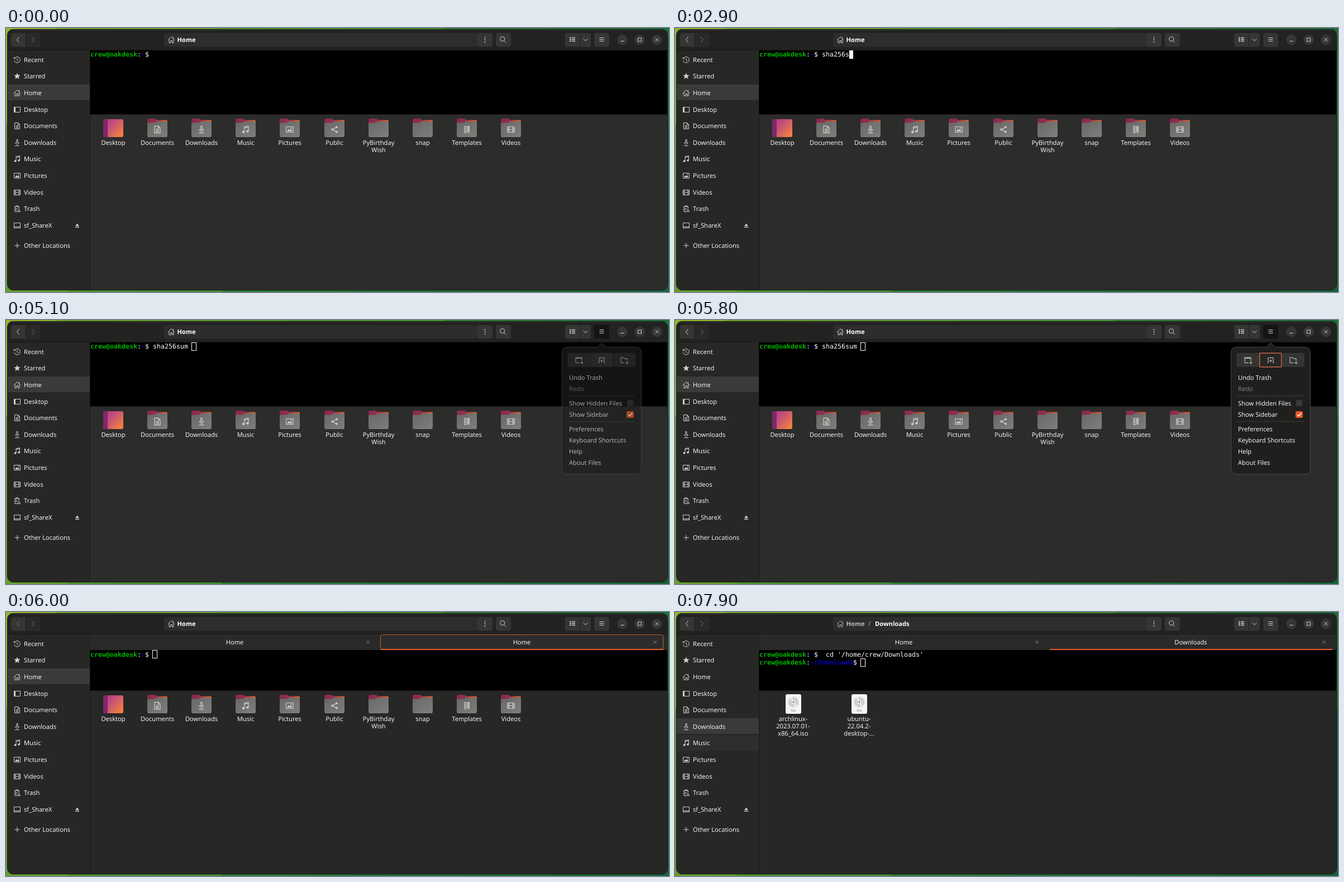
Write an HTML page that moves like this. It is 1187 px wide and 472 px high and loops after 8 s.

```html
<!DOCTYPE html>
<html lang="en">
<head>
<meta charset="utf-8">
<title>File manager with terminal</title>
<style>
html, body { margin: 0; width: 100%; height: 100%; overflow: hidden; background: #2a7a35; }
svg { display: block; width: 100%; height: 100%; }
text { font: 11.2px "Open Sans", "Noto Sans", sans-serif; fill: #fff; white-space: pre; text-rendering: geometricPrecision; }
.bold { font-weight: 700; }
.mid { text-anchor: middle; }
.dim { fill: #8a8a88; }
.term { font: 11.63px "DejaVu Sans Mono", monospace; fill: #fff; }
.term .user { font-weight: 700; fill: #00b400; }
.term .dir { font-weight: 700; fill: #0000b4; }
.icon { fill: none; stroke: #d2d2d0; stroke-width: 1; }
.icon .solid { fill: #d2d2d0; stroke: none; }
</style>
</head>
<body>
<svg id="stage" viewBox="0 0 1187 472">
  <defs>
    <linearGradient id="wallTop">
      <stop offset="0" stop-color="#93b62b"/><stop offset=".075" stop-color="#8db42b"/>
      <stop offset=".077" stop-color="#6fa42c"/><stop offset=".4" stop-color="#559a2e"/>
      <stop offset=".66" stop-color="#459330"/><stop offset=".663" stop-color="#2b8135"/>
      <stop offset="1" stop-color="#1b7038"/>
    </linearGradient>
    <linearGradient id="wallLow">
      <stop offset="0" stop-color="#679f2c"/><stop offset=".093" stop-color="#5f9b2c"/>
      <stop offset=".095" stop-color="#4b902e"/><stop offset=".325" stop-color="#3f8930"/>
      <stop offset=".327" stop-color="#2a7933"/><stop offset="1" stop-color="#17623a"/>
    </linearGradient>
    <linearGradient id="back"><stop offset="0" stop-color="#85294f"/><stop offset=".4" stop-color="#93304d"/><stop offset="1" stop-color="#ea652c"/></linearGradient>
    <linearGradient id="front" x2="1" y2="1"><stop offset="0" stop-color="#686866"/><stop offset="1" stop-color="#7e7e7c"/></linearGradient>
    <linearGradient id="frontHover" x2="1" y2="1"><stop offset="0" stop-color="#7b7b79"/><stop offset="1" stop-color="#929290"/></linearGradient>
    <linearGradient id="desk" x2="1" y2=".8"><stop offset="0" stop-color="#a83c86"/><stop offset=".4" stop-color="#c04e7c"/><stop offset="1" stop-color="#f5813f"/></linearGradient>
  </defs>
  <rect width="1187" height="172" fill="url(#wallTop)"/>
  <rect y="172" width="1187" height="300" fill="url(#wallLow)"/>
  <g id="scene"></g>
</svg>
<script>
const LOOP = 8000, USER = 'crew', HOST = 'oakdesk', CELL = 7;
const sceneEl = document.getElementById('scene');

const rect = (x, y, w, h, fill, r = 0, more = '') =>
  `<rect x="${x}" y="${y}" width="${w}" height="${h}" rx="${r}" fill="${fill}" ${more}/>`;
const text = (x, y, s, cls = '') => `<text x="${x}" y="${Math.round(y)}" class="${cls}">${s}</text>`;
const path = (d, cls = '') => `<path d="${d}" class="${cls}"/>`;
const at = (x, y, body, alpha = 1, scale = 1) =>
  `<g class="icon" transform="translate(${x} ${y}) scale(${scale})" opacity="${alpha}">${body}</g>`;

const icons = {
  Recent: path('M-4.6-2.8A5.3 5.3 0 1 1-5.2 1M-5.5-5V-2.2H-2.7M0-3V.5L2.5 2'),
  Starred: path('M0-5.8L1.6-1.8L5.8-1.6L2.5 1L3.6 5.2L0 2.8L-3.6 5.2L-2.5 1L-5.8-1.6L-1.6-1.8Z', 'solid'),
  Home: path('M-5.8.5L0-5.3L5.8.5M-4-1V5.5H-1V1.5H1.5V5.5H4V-1M3.5-5V-2'),
  Desktop: path('M-5.5-4.5H5.5V4.5H-5.5Z') + path('M-5.5-4.5H-3V4.5H-5.5Z', 'solid'),
  Documents: path('M-4.5-5.5H1.5L4.5-2.5V5.5H-4.5ZM1.5-5.5V-2.5H4.5M-2.5-.5H2.5M-2.5 1.5H2.5M-2.5 3.5H2.5'),
  Downloads: path('M-1-5.5H1V.2H3.4L0 3.6L-3.4.2H-1ZM-4 5.5H4'),
  Music: path('M-2 4V-4L4.5-5.5V2.8M-2-2.5L4.5-4') +
    '<g class="solid"><ellipse cx="-3.5" cy="4" rx="2" ry="1.7"/><ellipse cx="3" cy="2.8" rx="2" ry="1.7"/></g>',
  Pictures: path('M-5.5-4.5H5.5V4.5H-5.5Z') + path('M-4 3L-1.5-.8L.2 1L2-.6L4 3ZM1.5-3H3.3V-1.4H1.5Z', 'solid'),
  Videos: path('M-5.5-4.5H5.5V4.5H-5.5ZM-3-4.5V4.5M3-4.5V4.5M-3 0H3M-5.5-1.5H-3M-5.5 1.5H-3M3-1.5H5.5M3 1.5H5.5'),
  Trash: path('M-5-3.5H4M-2-3.5V-5.3H1.5V-3.5M-4-3.5V5.3H0M3.3-3.5V0M-2-1V3M0-1V1M.5 5.3L3 1L5.6 5.3Z'),
  sf_ShareX: path('M-5.5-4.5H5.5V4.5H-5.5ZM-5.5 2.5H5.5'),
  'Other Locations': path('M-4.5 0H4.5M0-4.5V4.5'),
  Public: path('M3.2-3.5L-3.2 0L3.2 3.5') +
    '<g class="solid"><circle cx="3.5" cy="-3.7" r="1.6"/><circle cx="-3.6" r="1.6"/><circle cx="3.5" cy="3.7" r="1.6"/></g>',
  Templates: path('M-3.5-5H-1V5H-3.5ZM-3.5-2H-2M-3.5 1H-2M1.5-5H4V3L2.8 5L1.5 3Z') + path('M1.5-5H2.8V5L1.5 3Z', 'solid'),
};
const places = ['Recent', 'Starred', 'Home', 'Desktop', 'Documents', 'Downloads',
  'Music', 'Pictures', 'Videos', 'Trash', 'sf_ShareX', 'Other Locations'];
const folders = ['Desktop', 'Documents', 'Downloads', 'Music', 'Pictures', 'Public',
  'PyBirthday Wish', 'snap', 'Templates', 'Videos'];

const button = (x, w, fill = '#353534') => rect(x, 9, w, 24.5, fill, 4);

function header(s) {
  let out = button(9, 53) + rect(35.5, 9, 26.5, 24.5, '#292928', 4) + rect(35, 9, 1, 24.5, '#1c1c1b');
  out += at(21.5, 21, path('M2-5L-2 0L2 5'), s.canBack ? 1 : .45);
  out += at(48.5, 21, path('M-2-5L2 0L-2 5'), .45);
  out += rect(283, 9, 561, 24.5, '#2d2d2c', 4) + button(844, 27) + button(877, 27);
  out += at(296, 21, icons.Home, s.downloads ? .75 : 1);
  out += s.downloads
    ? `<g opacity=".68">${text(306.5, 25, 'Home', 'bold')}${text(346, 25, '/')}</g>` + text(358, 25, 'Downloads', 'bold')
    : text(306.5, 25, 'Home', 'bold');
  out += at(857.5, 21, [-4, 0, 4].map(y => `<circle class="solid" cy="${y}" r="1.1"/>`).join(''));
  out += at(889.5, 20.5, '<circle cx="-.8" cy="-.8" r="4"/>' + path('M2.2 2.2L5.5 5.5'));
  out += button(1001, 46) + rect(1027, 9, 1, 24.5, '#222221');
  if (!s.loading) {
    out += at(1014, 20.5, [-3, 0, 3].map(y => path(`M-5 ${y - 1}H-2.6V${y + 1}H-5ZM-1 ${y - .7}H5V${y + .7}H-1Z`, 'solid')).join(''));
  }
  out += at(1037.5, 21, path('M-3.8-1.8L0 2L3.8-1.8'));
  out += button(1053, 27, s.menuDown ? '#141413' : '#353534');
  out += at(1066.5, 20.5, path('M-4-3H4M-4 0H4M-4 3H4'));
  ['M-3 2.5H3', 'M-3-3H3V3H-3Z', 'M-3-3L3 3M3-3L-3 3'].forEach((d, i) => {
    out += at(1103.5 + 31 * i, 21, '<circle r="9.3" fill="#373736" stroke="none"/>' + path(d));
  });
  return out;
}

function sidebar(s) {
  return places.map((name, i) => {
    const y = i < 11 ? 56.8 + 29.6 * i : 389;
    const fill = name === s.selected ? '#3a3a39' : name === s.hover ? '#2e2e2d' : '';
    return (fill ? rect(3, Math.round(y - 14.6), 147, 28, fill) : '') +
      at(20, Math.round(y), icons[name]) + text(32, y + 4, name);
  }).join('') + at(127.5, 353, path('M-3.4 1L0-3.6L3.4 1ZM-3.4 2.2H3.4V3.8H-3.4Z', 'solid'));
}

function folder(name, i, dy, hover) {
  const x = 192 + Math.round(79.1 * i);
  let out = `<g transform="translate(${x} ${dy})">`;
  if (!i) {
    out += rect(-18, 163, 36, 32, hover ? '#d0648c' : 'url(#desk)', 3) +
      '<path d="M-10 163H-15Q-18 163-18 166V192Q-18 195-15 195H-10Z" fill="#80286a"/>';
  } else {
    out += '<path d="M-18 165Q-18 162-15 162H-6Q-4 162-3 163.2L-1.5 164.5H15Q18 164.5 18 167V185H-18Z" fill="url(#back)"/>' +
      `<path d="M-18 171Q-18 169.5-16 169.5H-6Q-4 169.5-3 168.2Q-2 167-0 167H18V192Q18 195 15 195H-15Q-18 195-18 192Z" fill="url(#front${hover ? 'Hover' : ''})"/>` +
      '<path d="M-17 194.5H17" stroke="#858583" stroke-width=".8"/>';
    if (icons[name]) out += at(0, 181.5, icons[name], 1, 1.12);
  }
  name.split(' ').forEach((word, k) => out += text(0, 208.5 + 13 * k, word, 'mid'));
  return out + '</g>';
}

function iso(x, lines) {
  return rect(x - 13, 147, 28, 35, '#f6f5f4', 3) +
    `<circle cx="${x + 1}" cy="161" r="9.5" fill="#cfcfcd"/>` +
    `<path d="M${x + 1} 161L${x - 6} 154.6A9.5 9.5 0 0 1 ${x - 1} 151.7ZM${x + 1} 161L${x + 8} 167.4A9.5 9.5 0 0 1 ${x + 3} 170.3Z" fill="#e6e6e4"/>` +
    `<circle cx="${x + 1}" cy="161" r="3" fill="#f6f5f4"/><circle cx="${x + 1}" cy="161" r="1.3" fill="#444"/>` +
    `<text x="${x + 1}" y="178" class="mid" style="font-size:7px;fill:#777">iso</text>` +
    lines.map((l, k) => text(x + .5, 194.5 + 13 * k, l, 'mid')).join('');
}

function prompt(y, dir, cmd) {
  return `<text x="151" y="${y}" class="term"><tspan class="user">${USER}@${HOST}</tspan>:<tspan class="dir">${dir}</tspan>$ ${cmd}</text>`;
}

function cursor(col, y, kind) {
  const x = 151 + col * CELL;
  if (kind === 'block') return rect(x, y, 7, 15, '#fff');
  if (kind === 'hollow') return rect(x - .5, y + .5, 8, 14, 'none', 0, 'stroke="#fff"');
  return '';
}

function terminal(s) {
  const y = s.tabs ? 68 : 40;
  const col = USER.length + HOST.length + 5;
  let out = rect(150.5, y, 1033.5, s.tabs ? 72.5 : 114.5, '#000');
  if (s.cd) {
    out += prompt(80, '~', ` cd '/home/${USER}/Downloads'`) + prompt(94, '~/Downloads', '');
    return out + cursor(col + 10, 83, 'hollow');
  }
  return out + prompt(y + (s.tabs ? 12 : 11), '~', s.typed) + cursor(col + s.typed.length, y, s.cursor);
}

function tabs(s) {
  const close = x => at(x, 54, path('M-2.8-2.8L2.8 2.8M2.8-2.8L-2.8 2.8'), .5);
  const title = s.loading ? 'Loading…' : s.downloads ? 'Downloads' : 'Home';
  let out = rect(150.5, 40, 1033.5, 28, '#2a2a29') + rect(150.5, 68, 1033.5, 1, '#1a1a19');
  if (!s.downloads) out += rect(670.5, 40.5, 506, 27, '#2c2c2b', 4, 'stroke="#c4633f"');
  out += rect(671, 66, 506, 2.5, '#e95f2c', 1);
  if (s.loading) out += at(686, 54, '<circle r="4.2" stroke-width="1.6" stroke-dasharray="6 2.8"/>');
  return out + text(409.5, 58, 'Home', 'mid') + text(923.5, 58, title, 'mid') + close(648) + close(1162);
}

function menu(s) {
  const item = (y, label, cls) => text(1008, y + 4, label, cls);
  const line = y => rect(1006, y, 120, 1, '#3d3d3c');
  let out = `<g opacity="${s.menu}"><path d="M1005 48.5H1058.5L1066.5 41L1074.5 48.5H1127.5Q1137.5 48.5 1137.5 58.5V265.5Q1137.5 275.5 1127.5 275.5H1005Q995.5 275.5 995.5 265.5V58.5Q995.5 48.5 1005 48.5Z" fill="#1f1f1e" stroke="#484847"/>`;
  out += rect(1005.5, 59, 121.5, 25, '#353534', 4) + rect(1046, 59, .8, 25, '#222') + rect(1086, 59, .8, 25, '#222');
  out += s.pressed ? rect(1046.7, 59.2, 39, 24.8, '#272726', 1, 'stroke="#c8683f" stroke-width="1.5"')
    : rect(1047, 59, 39, 25, '#3d3d3c');
  out += at(1025.5, 72, path('M1 4.5H-5.5V-5H5.5V1M-5.5-3.5H5.5M3 4.5H8M5.5 2V7'));
  out += at(1066.5, 72, path('M-6 4.5H-4.5V-4.5H4.5V4.5H6M-2.5 1H2.5M0-1.5V3.5'));
  out += at(1106.5, 72, path('M1 4.5H-5.5V-5H-1L.5-3H5.5V1M3 4.5H8M5.5 2V7'));
  out += item(102.8, 'Undo Trash') + item(123, 'Redo', 'dim') + line(135);
  out += item(148.5, 'Show Hidden Files') + item(169, 'Show Sidebar') + line(181);
  out += item(194.8, 'Preferences') + item(215, 'Keyboard Shortcuts') + item(235, 'Help') + item(255.3, 'About Files');
  out += rect(1112, 143, 11, 11, '#3b3b3a', 2) + rect(1111, 163, 13, 12, '#e95420', 2.5);
  return out + '<path d="M1114 169L1116.6 171.6L1121.2 166.4" fill="none" stroke="#fff" stroke-width="1.7"/></g>';
}

// Time at which each character of the command appears
const keys = [700, 800, 1000, 1800, 2300, 2400, 2900, 3000, 3300, 3600];
const command = 'sha256sum ';
const between = (t, a, b) => t >= a && t < b;

function stateAt(t) {
  const tabsOpen = t >= 5900;
  const blink = t < 400 || between(t, 1500, 1700) || between(t, 4100, 4800);
  return {
    tabs: tabsOpen,
    typed: tabsOpen ? '' : command.slice(0, keys.filter(k => k <= t).length),
    cursor: t >= 5000 ? 'hollow' : blink ? '' : 'block',
    menu: between(t, 5000, 5900) ? Math.min(1, (Math.floor((t - 5000) / 100) + 1) / 3) : 0,
    menuDown: between(t, 5000, 6000),
    pressed: t >= 5800,
    loading: between(t, 5900, 6000) || between(t, 7600, 7800),
    canBack: t < 6000 || t >= 7600,
    downloads: t >= 7600,
    cd: t >= 7800,
    selected: t >= 7600 ? 'Downloads' : 'Home',
    hover: t >= 7300 ? (between(t, 7400, 7600) ? 'Downloads' : 'Music') : '',
    pointed: between(t, 7000, 7100) ? 1 : between(t, 7100, 7200) ? 0 : -1,
  };
}

function draw(s) {
  let out = rect(2.5, 2.5, 1182, 466, '#272726', 10, 'stroke="#1a1a19"');
  out += '<path d="M3 39.5V12Q3 3 12 3H1175Q1184 3 1184 12V39.5Z" fill="#222221"/>';
  out += '<path d="M12 3.5H1175" stroke="#373736"/>' + rect(3, 39, 1181, 1, '#191918');
  if (!s.tabs) out += '<path d="M150 40H1184V458Q1184 468 1175 468H150Z" fill="#2c2c2b"/>';
  out += rect(150, 40, 1, 428, '#1a1a19') + header(s) + sidebar(s);
  if (s.tabs) out += tabs(s);
  if (!s.loading) {
    out += terminal(s);
    out += s.downloads
      ? iso(211, ['archlinux-', '2023.07.01-', 'x86_64.iso']) + iso(329, ['ubuntu-', '22.04.2-', 'desktop-…'])
      : folders.map((f, i) => folder(f, i, s.tabs ? -14 : 0, i === s.pointed)).join('');
  }
  return out + (s.menu ? menu(s) : '');
}

let shown = '';
function frame(now) {
  const state = stateAt(now % LOOP), key = JSON.stringify(state);
  if (key !== shown) {
    sceneEl.innerHTML = draw(state);
    shown = key;
  }
  requestAnimationFrame(frame);
}
frame(performance.now());
</script>
</body>
</html>
```
